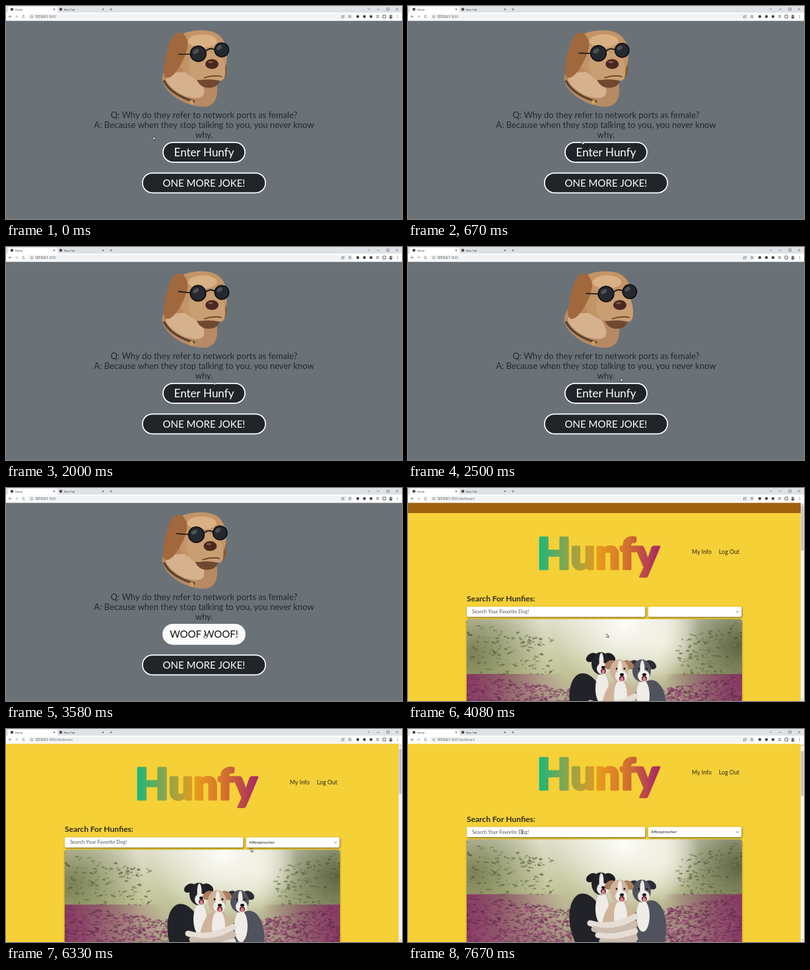
Recreate the animation shown at these times as an HTML page with a canvas. Size 600 px wide and 323 px high, loop 8000 ms.

```html
<!DOCTYPE html>
<html lang="en">
<head>
<meta charset="utf-8">
<title>Hunfy</title>
<style>
html, body { margin: 0; width: 100%; height: 100%; overflow: hidden; background: #6a7278; }
canvas { display: block; width: 100vw; height: 100vh; }
</style>
</head>
<body>
<canvas id="stage" width="600" height="323"></canvas>
<script>
const c = document.getElementById('stage').getContext('2d');
const LOOP = 8000, STEP = 1000 / 12;
const NAV = 3910, LIST = 4410, SCROLL_FROM = 6170, SCROLL_TO = 6497, SCROLL = 31.5;
const UI = 'Roboto, sans-serif', HAND = 'Lato, sans-serif';
const TAU = Math.PI * 2;

// time, x, y of the pointer tip
const mouse = [
  [0, 223, 198], [1330, 304, 212], [2500, 322, 199], [3580, 301, 221], [4500, 301, 221],
  [4900, 285, 104], [5420, 298, 110], [5670, 289, 167], [6330, 371, 181], [7660, 173, 156]
];

const ease = u => u * u * (3 - 2 * u);
const clamp = u => Math.max(0, Math.min(1, u));

function pointer(t) {
  const i = mouse.findIndex(k => k[0] > t);
  if (i < 0) return mouse[mouse.length - 1].slice(1);
  const [t0, x0, y0] = mouse[i - 1], [t1, x1, y1] = mouse[i];
  const u = ease((t - t0) / (t1 - t0));
  return [x0 + (x1 - x0) * u, y0 + (y1 - y0) * u];
}

function random(seed) {
  return () => (seed = (seed * 16807) % 2147483647) / 2147483647;
}

function rect(x, y, w, h, fill) {
  c.fillStyle = fill;
  c.fillRect(x, y, w, h);
}

function stroke(color, width) {
  c.strokeStyle = color;
  c.lineWidth = width;
  c.stroke();
}

function round(x, y, w, h, r, fill, edge, width) {
  c.beginPath();
  c.roundRect(x, y, w, h, r);
  c.fillStyle = fill;
  c.fill();
  if (edge) stroke(edge, width);
}

function oval(x, y, rx, ry, fill, turn = 0) {
  c.beginPath();
  c.ellipse(x, y, rx, ry, turn, 0, TAU);
  c.fillStyle = fill;
  c.fill();
}

function line(points, color, width) {
  c.beginPath();
  points.forEach(p => c.lineTo(...p));
  stroke(color, width);
}

function curve(x0, y0, cx, cy, x1, y1, color, width) {
  c.beginPath();
  c.moveTo(x0, y0);
  c.quadraticCurveTo(cx, cy, x1, y1);
  stroke(color, width);
}

// smooth closed shape around a few corners
function blob(fill, ...p) {
  const n = p.length / 2;
  const at = i => [p[(i % n) * 2], p[(i % n) * 2 + 1]];
  const mid = i => at(i).map((v, k) => (v + at(i + 1)[k]) / 2);
  c.beginPath();
  c.moveTo(...mid(0));
  for (let i = 1; i <= n; i++) c.quadraticCurveTo(...at(i), ...mid(i));
  c.fillStyle = fill;
  c.fill();
}

function text(s, x, y, font, fill, align = 'left') {
  c.font = font;
  c.fillStyle = fill;
  c.textAlign = align;
  c.fillText(s, x, y);
}

function ramp(x0, y0, x1, y1, ...colors) {
  const g = c.createLinearGradient(x0, y0, x1, y1);
  colors.forEach((col, i) => g.addColorStop(i / (colors.length - 1), col));
  return g;
}

function glow(x, y, r, color) {
  const g = c.createRadialGradient(x, y, 0, x, y, r);
  g.addColorStop(0, color);
  g.addColorStop(1, color.slice(0, 7) + '00');
  rect(x - r, y - r, 2 * r, 2 * r, g);
}

function chevron(x, y, w, h, color) {
  line([[x - w, y - h], [x, y], [x + w, y - h]], color, 0.8);
}

function cross(x, y, r, color) {
  for (const s of [-1, 1]) line([[x - r, y - r * s], [x + r, y + r * s]], color, 0.7);
}

function navArrow(x, way, color) {
  line([[x - 2, 16], [x + 2, 16]], color, 0.8);
  line([[x, 14.2], [x + 2 * way, 16], [x, 17.8]], color, 0.8);
}

function tab(x, label) {
  oval(x, 5, 2.3, 2.3, '#4a4e52');
  text(label, x + 5, 6.7, '4.2px ' + UI, '#3c4043');
  cross(x + 64, 5, 1.2, '#3c4043');
}

function browser(path) {
  const ink = '#5f6368';
  rect(0, 0, 600, 10.5, '#dee1e6');
  rect(0, 10, 600, 12.5, '#fff');
  round(3, 1, 75, 11, 2.5, '#fff');
  tab(9, 'Hunfy');
  tab(83, 'New Tab');
  line([[157, 5], [161, 5]], ink, 0.7);
  line([[159, 3], [159, 7]], ink, 0.7);
  chevron(549.5, 5.5, 1.5, 1.5, ink);
  line([[562, 5], [566, 5]], ink, 0.7);
  c.strokeRect(577, 3, 3.5, 3.5);
  cross(592.5, 4.8, 1.7, ink);

  navArrow(6.5, -1, ink);
  navArrow(16, 1, '#a8acb0');
  c.beginPath();
  c.arc(27, 16, 1.9, 0.3, 5.3);
  stroke(ink, 0.8);
  round(33, 11.7, 493, 8.8, 4.4, '#f1f3f4');
  c.beginPath();
  c.arc(39, 16.2, 1.7, 0, TAU);
  stroke(ink, 0.6);
  text('127.0.0.1', 44, 17.9, '4.8px ' + UI, '#202124');
  const w = c.measureText('127.0.0.1').width;
  text(':5000' + path, 44 + w, 17.9, '4.8px ' + UI, '#777b80');

  c.strokeRect(508.5, 15, 3.5, 3);
  line([[510, 16], [513, 13.5]], ink, 0.6);
  c.beginPath();
  for (let i = 0; i < 11; i++) {
    const r = i % 2 ? 1 : 2.3, a = i * Math.PI / 5 - Math.PI / 2;
    c.lineTo(521 + r * Math.cos(a), 16 + r * Math.sin(a));
  }
  stroke(ink, 0.6);
  for (let i = 0; i < 3; i++) {
    oval(533 + i * 10, 16, 2.2, 2.2, '#44484d');
    line([[561, 14.5 + i * 1.5], [565, 14.5 + i * 1.5]], ink, 0.7);
    oval(593.5, 14.2 + i * 1.8, 0.55, 0.55, ink);
  }
  round(571, 13.8, 4.4, 4.4, 0.5, '#fff', '#303338', 0.8);
  oval(583, 16, 3.3, 3.3, '#cfd2d4');
  oval(583, 15, 1.2, 1.2, '#4b4b4d');
  oval(583, 17.8, 2.1, 1.2, '#4b4b4d');
}

// the face sways over a still body
function coolDog(t) {
  const a = TAU * (t / 750 - 1 / 3);
  const sway = 6 * Math.cos(a), tilt = -0.1 + 0.07 * Math.sin(a);

  blob('#b88a63', 250, 82, 230, 114, 268, 150, 322, 155, 318, 90);
  blob('#d6b18e', 250, 100, 238, 112, 268, 139, 306, 140, 290, 100);
  curve(239, 113, 250, 135, 286, 145, '#5d4230', 3.5);
  oval(281, 146, 3, 3.5, '#caa15b');

  c.save();
  c.translate(sway * 0.4, 0);
  oval(329, 88, 6, 20, '#8b5a36', -0.15);
  blob('#c39466', 252, 40, 330, 34, 340, 96, 300, 116, 262, 96);
  oval(299, 53, 22, 10, '#d9b184');
  blob('#a0683c', 270, 38, 250, 44, 236, 110, 256, 108, 280, 62);
  c.restore();

  c.save();
  c.translate(sway, 0);
  blob('#70472f', 286, 94, 296, 124, 324, 124, 332, 98);
  blob('#c99e72', 276, 78, 304, 66, 334, 76, 336, 116, 314, 110, 284, 114);
  curve(303, 109, 317, 104, 330, 107, '#654029', 1.5);
  oval(315, 88, 10, 7.5, '#4a2821');
  oval(313, 85, 3.5, 1.6, '#87594c');

  c.translate(312, 69.5);
  c.rotate(tilt);
  line([[-28, -1], [-48, -4]], '#1b1a1c', 1.7);
  curve(-6, -2, 1, -7, 8, -2, '#151518', 1.8);
  for (const side of [-1, 1]) {
    const x = side * 18, r = 12 - side * 0.6;
    oval(x, 0, r, r, '#0d0e11');
    oval(x, 0, r - 1.7, r - 1.7, '#25282d');
    oval(x - 3, -4, r * 0.4, r * 0.25, '#4b5057', -0.5);
  }
  c.restore();
}

function pill(y, w, label, size, lit) {
  round(300 - w / 2, y, w, 30, 15, lit ? '#f9fafa' : '#212529', '#fff', 1.7);
  text(label, 300, y + 15 + size * 0.35, size + 'px ' + HAND, lit ? '#111' : '#fff', 'center');
}

const overEnter = (x, y) => x > 238 && x < 362 && y > 206 && y < 238;

function welcome(t, x, y) {
  rect(0, 22, 600, 301, '#6a7278');
  coolDog(t);
  [
    'Q: Why do they refer to network ports as female?',
    'A: Because when they stop talking to you, you never know',
    'why.'
  ].forEach((s, i) => text(s, 300, 169.5 + i * 15.4, '13px ' + HAND, '#24282d', 'center'));
  if (overEnter(x, y)) pill(206.8, 124, 'WOOF WOOF!', 15, true);
  else pill(206.8, 124, 'Enter Hunfy', 17, false);
  pill(253.3, 186.4, 'ONE MORE JOKE!', 15, false);
}

// soft specks, thickest at both sides of the picture
function specks(seed, count, reach, hue, place) {
  const rnd = random(seed);
  for (let i = 0; i < count; i++) {
    const u = rnd(), x = i % 2 ? 89 + u * reach : 506 - u * reach * 0.75;
    const light = 22 + rnd() * 24;
    oval(x, place(u, rnd()), 1 + rnd() * 3, 0.7 + rnd(), `hsl(${hue} ${light}% / 0.55)`, rnd() - 0.5);
  }
}

function friend(x, y, lean, coat, ear) {
  const white = '#efebe6';
  oval(x + lean, y + 64, 27, 50, coat, lean * 0.012);
  oval(x + 2, y + 38, 10, 24, white);
  for (const side of [-1, 1]) oval(x + side * 14, y - 9, 9, 6, ear, side * 0.6);
  oval(x, y, 14, 17, coat);
  oval(x + 1, y - 3, 3.5, 13, white);
  oval(x + 3, y + 8, 9, 9, white);
  for (const side of [-1, 1]) oval(x + 2 + side * 6, y - 3, 1.4, 1.4, '#1d1714');
  oval(x + 4, y + 12, 4, 4, '#5b2229');
  oval(x + 4, y + 13, 2.6, 3.2, '#d9818c');
  oval(x + 4, y + 6, 3, 2.2, '#171416');
}

function friends() {
  friend(354, 277, 10, '#50535d', '#2c2d34');
  friend(292, 266, -19, '#222328', '#1c1d21');
  friend(320, 277, 0, '#cfb39a', '#a97f60');
  c.lineCap = 'round';
  for (let i = 0; i < 4; i++) {
    curve(276 + i * 6, 326 + i * 9, 308, 336 + i * 7, 344, 316 + i * 11, i % 2 ? '#cbbcb0' : '#e6ddd5', 9);
  }
  c.lineCap = 'butt';
}

function photo() {
  c.save();
  c.shadowColor = '#0007';
  c.shadowBlur = 3;
  c.shadowOffsetY = 1;
  round(89, 199, 417, 240, 3, '#cfceb2');
  c.restore();
  c.save();
  c.beginPath();
  c.roundRect(89, 199, 417, 240, 3);
  c.clip();
  rect(89, 199, 417, 160, ramp(0, 199, 0, 350, '#dfdfcb', '#c3c69a', '#a99a83'));
  glow(100, 250, 110, '#6f7648dd');
  glow(500, 240, 120, '#59613ef5');
  glow(330, 205, 110, '#fdfcf8ff');
  glow(385, 230, 60, '#f6f4e8cc');
  specks(3, 300, 130, '75 24%', (u, v) => 203 + u * 25 + v * (80 - u * 25));
  rect(89, 282, 150, 80, ramp(89, 0, 239, 0, '#863361ee', '#86336100'));
  rect(386, 282, 120, 80, ramp(506, 0, 386, 0, '#863361ee', '#86336100'));
  specks(7, 1300, 175, '323 42%', (u, v) => 282 + u * 26 + v * (76 - u * 26));
  friends();
  c.restore();
}

function field(x, w) {
  c.save();
  c.shadowColor = '#0009';
  c.shadowBlur = 2.5;
  c.shadowOffsetX = 0.7;
  c.shadowOffsetY = 1;
  round(x, 180, w, 15.5, 2, '#fff');
  c.restore();
}

function wordmark() {
  const paint = ramp(199, 0, 377, 0, '#1fb67a', '#8fa44b', '#e79a1c', '#d2702f', '#a92d60');
  text('Hunfy', 288, 123, '900 66px ' + HAND, paint, 'center');
  c.lineJoin = 'round';
  c.strokeStyle = paint;
  c.lineWidth = 3;
  c.strokeText('Hunfy', 288, 123);
  c.lineJoin = 'miter';
}

function dashboard(t) {
  const s = SCROLL * ease(clamp((t - SCROLL_FROM) / (SCROLL_TO - SCROLL_FROM)));
  const ink = '#2d2a20';
  rect(0, 22, 600, 301, '#f5d037');
  c.save();
  c.translate(0, -s);
  rect(0, 22, 595, 16, '#a0610f');
  wordmark();
  text('My Info', 430, 100, '8.8px ' + HAND, ink);
  text('Log Out', 471, 100, '8.8px ' + HAND, ink);
  text('Search For Hunfies:', 89, 172, 'bold 12px ' + HAND, ink);
  field(89, 270.5);
  field(364, 141.5);
  text('Search Your Favorite Dog!', 97, 190, '7.6px ' + HAND, '#55565a');
  if (t >= LIST) text('Affenpinscher', 368, 189.6, '6.4px ' + HAND, '#222');
  chevron(499.2, 188.6, 1.9, 1.8, '#444');
  photo();
  c.restore();
  rect(595, 22, 5, 301, '#f1f1f1');
  rect(595.6, 27 + s * 0.21, 3.8, 68, '#c1c1c1');
  chevron(597.5, 24.3, 1, -1.2, '#666');
  chevron(597.5, 320.7, 1, 1.2, '#666');
}

function cursor(t, x, y) {
  if (t < NAV && overEnter(x, y)) {
    round(x - 1.5, y + 3, 5, 4, 1.5, '#fff', '#222', 0.6);
    round(x - 0.6, y, 1.4, 5, 0.7, '#fff', '#222', 0.5);
  } else if (t > SCROLL_TO && x < 359.5 && y > 148.5 && y < 164) {
    line([[x, y - 3], [x, y + 3]], '#222', 0.8);
    for (const d of [-3, 3]) line([[x - 1.2, y + d], [x + 1.2, y + d]], '#222', 0.6);
  } else {
    line([[x + 1.4, y + 3], [x + 2.6, y + 6]], '#222', 1.2);
    c.beginPath();
    c.moveTo(x, y);
    c.lineTo(x, y + 5.2);
    c.lineTo(x + 3.8, y + 3.8);
    c.closePath();
    c.fillStyle = '#fff';
    c.fill();
    stroke('#222', 0.6);
  }
}

function draw(now) {
  const t = Math.floor((now % LOOP + 4) / STEP) * STEP % LOOP;
  const [x, y] = pointer(t);
  if (t < NAV) welcome(t, x, y);
  else dashboard(t);
  browser(t < NAV ? '' : '/dashboard');
  cursor(t, x, y);
}

const start = performance.now();
function tick() {
  draw(performance.now() - start);
  requestAnimationFrame(tick);
}
tick();
</script>
</body>
</html>
```
